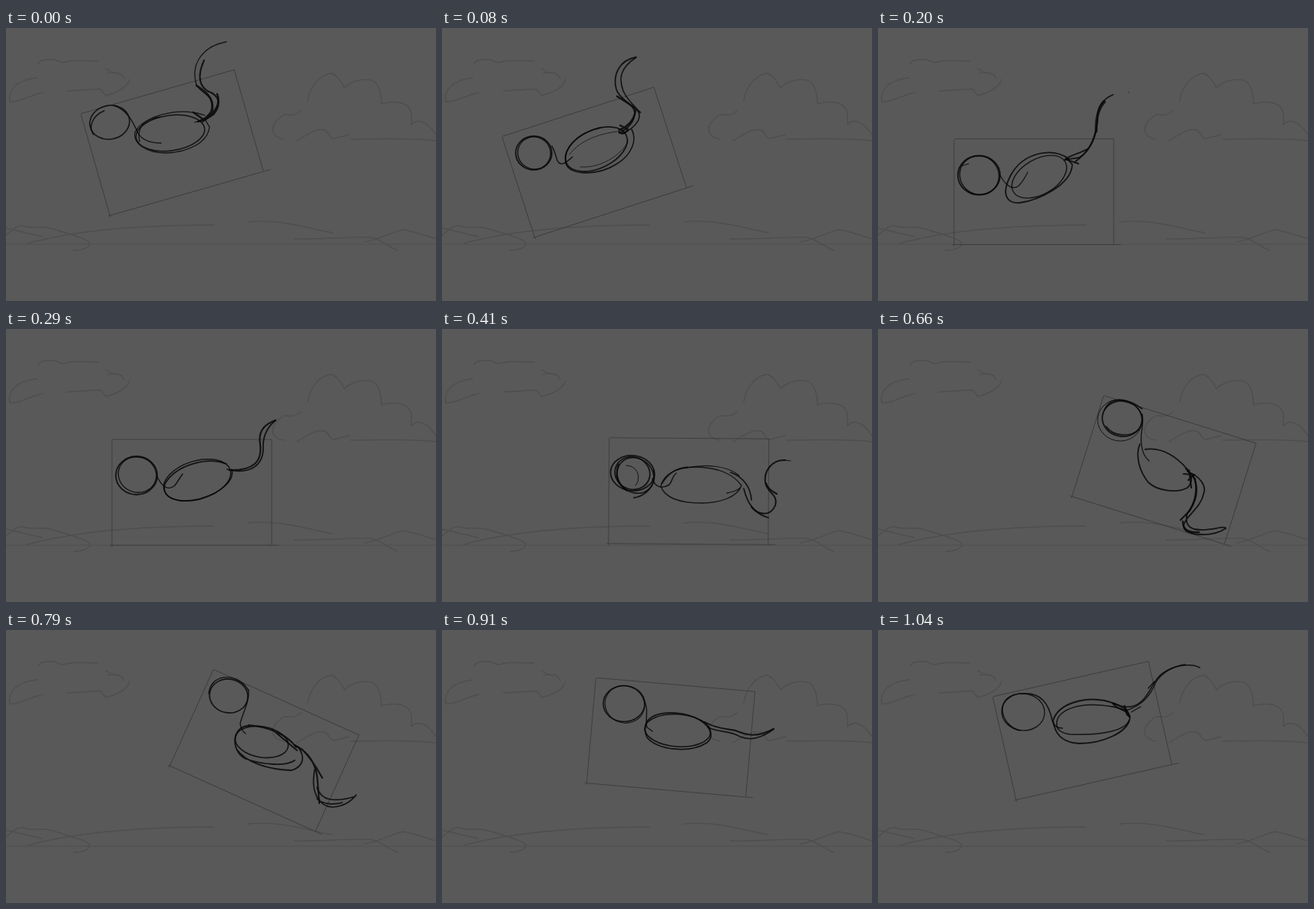
Animation, 560 px wide and 356 px high, one loop 1.16 s. Source, as an HTML page:

```html
<!DOCTYPE html>
<html lang="en">
<head>
<meta charset="utf-8">
<title>Leaping sketch</title>
<style>
html, body { margin: 0; width: 100%; height: 100%; overflow: hidden; background: #595959; }
svg { display: block; width: 100%; height: 100%; }
path, ellipse { fill: none; stroke-linecap: round; stroke-linejoin: round; }
#scenery path { stroke: #4e4e4e; stroke-width: 1.4; }
.frame { stroke: #393939; stroke-width: .8; }
.ink { stroke: #080808; }
</style>
</head>
<body>
<svg id="stage" viewBox="0 0 560 356" xmlns="http://www.w3.org/2000/svg">
  <g id="scenery">
    <path d="M5 96C2 82 12 68 40 65M5 96C15 98 30 88 48 84M42 47C44 41 52 41 62 41C66 41 70 46 75 45C83 42 90 42 120 43M130 53L138 58L146 59M132 59C145 57 150 58 154 66M161 67C158 78 145 84 130 88C124 82 126 78 115 80L80 82"/>
    <path d="M393 95C396 75 410 60 424 59C432 62 436 70 441 78C450 68 470 64 480 70C488 78 489 90 489 99C500 95 515 96 522 101C530 108 528 115 528 126C538 116 550 124 560 139"/>
    <path d="M384 108C375 116 370 113 362 113C350 120 346 128 348 136C350 142 356 144 362 145M379 147C390 140 405 130 415 133C422 136 420 144 428 144L447 139M449 145C490 144 530 144 560 147"/>
    <path d="M28 281C90 264 180 257 270 257M0 270C10 262 14 257 22 258C35 262 45 258 58 261C80 268 105 274 109 280C110 287 98 290 88 290M0 261L47 272"/>
    <path d="M315 253C350 248 390 260 425 267M375 275C410 276 440 272 475 273C490 276 495 284 510 290M467 279C485 276 505 265 517 263C530 265 545 270 560 275"/>
    <path d="M0 282H560" style="stroke-width:1"/>
  </g>
</svg>
<script>
const stage = document.getElementById('stage');
const LOOP = 1160;

function add(parent, tag, attrs) {
  const node = document.createElementNS(stage.namespaceURI, tag);
  for (const key in attrs) node.setAttribute(key, attrs[key]);
  return parent.appendChild(node);
}

// box: centre x, centre y, angle; rings: cx, cy, rx, ry, angle, width; lines: width, path
const poses = [
  { at: 0, box: [216.3, 149.5, -16],
    rings: [[135, 123, 26, 22, -12, 1.6], [214, 137, 45, 23, -8, 1.5]],
    lines: [
      [1.4, 'M128 108C112 114 107 130 114 139M140 101C158 106 166 124 172 137C178 148 190 150 202 150'],
      [1.3, 'M259 114C225 102 178 115 168 136C165 150 182 163 208 163C240 162 263 148 265 129L259 119M174 148C170 130 180 118 201 116'],
      [1.3, 'M287 18C255 24 240 48 248 74C254 86 268 85 268 103C267 115 256 120 246 123'],
      [2, 'M258 42C249 62 252 75 262 82C280 88 280 102 270 113L256 122'],
      [2.4, 'M248 75C266 86 272 96 268 110L258 120M275 86C280 98 272 116 250 122M244 110L258 120']
    ] },
  { at: 80, box: [198.3, 175, -18],
    rings: [[119.5, 163, 23.5, 22, 0, 1.8], [120, 163, 21.5, 21, 30, 1.4], [201, 158, 43, 25, -25, 1.7]],
    lines: [
      [1.4, 'M143 154C150 165 148 176 155 177C160 178 165 172 170 168'],
      [1.6, 'M247 132C255 147 246 166 228 177C205 192 166 194 161 176C158 158 174 137 207 130'],
      [.8, 'M166 165C180 146 205 138 228 135M180 181C205 184 235 165 242 148'],
      [1.8, 'M253 38C230 42 222 62 227 80C232 95 250 98 251 110C251 122 244 130 231 137'],
      [1.6, 'M252 39C232 52 230 66 236 82C244 100 258 104 257 116C255 126 245 133 235 138'],
      [2.3, 'M228 89C240 97 248 101 258 110M252 108C250 122 239 130 231 133C228 138 238 140 242 132L232 127']
    ] },
  { at: 160, box: [198, 198, -9],
    rings: [[122, 179, 25, 24, 0, 1.8], [123, 178, 23, 23, 0, 1.3], [204, 177, 43, 25, -28, 1.6]],
    lines: [
      [1.4, 'M147 174C154 188 158 196 168 194C175 191 180 183 183 178'],
      [1.6, 'M247 151C256 164 246 186 220 200C196 212 164 215 163 196C165 175 185 151 215 148'],
      [2.2, 'M276 62C257 71 256 85 260 104C268 128 262 143 239 155'],
      [1.9, 'M276 62C262 76 261 92 266 108C270 135 258 148 238 157']
    ] },
  { at: 200, box: [203, 213.5, 0],
    rings: [[131.5, 192, 27.5, 25.5, 0, 1.8], [132, 192, 26, 25, 40, 1.5], [210, 194, 39, 23, -30, 1.4]],
    lines: [
      [1.2, 'M108 180L118 177M159 192C166 205 175 212 183 206C189 200 192 194 195 188'],
      [1.8, 'M248 170C225 155 190 163 174 190C160 215 166 229 184 228C208 225 252 205 253 178L245 169'],
      [1.8, 'M306 87C290 94 286 104 286 115C286 140 277 160 262 169L243 172'],
      [3.5, 'M295 96C287 105 284 116 284 135'],
      [2, 'M283 136C279 153 271 164 256 175M274 157C263 164 254 164 244 171L261 177'],
      [.7, 'M326 84L327 84']
    ] },
  { at: 290, box: [242, 213, 0],
    rings: [[170, 191, 27, 25, 0, 1.8], [171, 190, 25, 23, 20, 1.4], [249, 197, 45, 25, -17, 1.5]],
    lines: [
      [1.4, 'M197 193C204 207 212 211 220 204L230 189'],
      [1.6, 'M287 176C263 166 221 177 207 202C202 220 222 228 250 222C281 214 298 197 294 183'],
      [2.2, 'M351 119C331 126 329 139 331 150C334 173 322 185 291 184'],
      [1.8, 'M351 119C337 131 334 145 335 157C334 180 315 190 288 183']
    ] },
  { at: 350, box: [282, 212, .2],
    rings: [[209, 190, 27, 24, 0, 1.8], [210, 189, 25, 22, 15, 1.5], [294, 201, 50, 24, -5, 1.5]],
    lines: [
      [1.4, 'M236 194C241 207 250 210 258 203L267 188'],
      [1.4, 'M247 202C254 184 281 175 308 178C330 180 346 190 346 201'],
      [2, 'M342 190C355 211 371 220 381 209C391 194 376 181 381 165C386 151 398 147 407 148'],
      [1.8, 'M346 198C357 219 374 222 382 207']
    ] },
  { at: 410, box: [321.3, 211.5, .4],
    rings: [[248, 188, 28.5, 23, 5, 1.8], [248, 188, 23, 21, 20, 1.8], [252, 191, 25, 22, 40, 1.5]],
    lines: [
      [1, 'M240 178C255 178 260 195 252 204'],
      [1.8, 'M276 184C280 205 264 218 250 220M230 176C224 192 230 204 241 211'],
      [1.5, 'M274 195C278 208 288 208 296 203C300 198 300 192 305 188M286 202C295 188 305 181 320 180'],
      [1.3, 'M285 205C288 190 305 180 330 180C360 180 380 190 390 204C385 220 360 227 338 227C310 227 290 220 285 205M390 204C388 210 380 212 371 214'],
      [1.2, 'M318 181C345 176 371 178 387 191'],
      [1.7, 'M376 187C393 193 402 207 403 223M393 208C398 230 410 242 425 246'],
      [2, 'M403 232C412 243 428 245 434 230C438 215 424 215 421 200C419 185 430 170 447 171'],
      [1, 'M445 171L454 172'],
      [2.2, 'M422 201C424 209 432 213 436 215']
    ] },
  { at: 540, box: [346, 203, 8],
    rings: [[284, 153, 27, 23.5, 5, 1.8], [283, 154, 25, 24, 30, 1.3]],
    lines: [
      [1.5, 'M311 154C315 169 311 180 319 184C323 184 325 179 327 175'],
      [1.7, 'M314 178C312 195 325 213 352 217C378 220 397 212 399 200C391 182 360 167 331 170C322 172 316 176 314 178'],
      [1.8, 'M391 190C409 199 415 213 414 224C407 243 416 258 431 254C439 247 440 236 453 230'],
      [1.9, 'M397 199C409 214 403 235 411 249C422 261 435 255 439 241']
    ] },
  { at: 660, box: [372.5, 183.7, 17.4],
    rings: [[318, 117, 26, 23, 10, 1.8], [315, 119, 29, 27, 10, .9]],
    lines: [
      [1.6, 'M295 106C302 87 325 90 344 104M297 127C308 142 330 140 340 131'],
      [1.4, 'M344 111C347 125 341 135 343 150C344 160 348 168 353 172'],
      [1.8, 'M341 150C335 165 340 185 352 200C365 212 390 214 403 207C410 200 410 192 402 182C390 168 370 153 348 157'],
      [1.8, 'M403 186C420 192 428 205 424 215C420 235 398 245 398 258C400 270 435 272 453 260C452 255 430 265 412 261C402 258 400 250 403 240C412 228 416 215 413 195'],
      [2.3, 'M410 191C419 208 414 224 406 237L394 249M397 251C397 262 405 266 418 265'],
      [2.2, 'M401 182L411 193M398 189L412 190L404 197M405 184L408 207']
    ] },
  { at: 790, box: [336.5, 157, 24.3],
    rings: [[290, 86, 25, 22, 10, 1.7], [333, 146, 35, 20, 10, 1.6]],
    lines: [
      [1.4, 'M264 83C267 53 307 57 316 80M316 78C317 95 308 108 305 122C306 130 309 133 312 135'],
      [1.8, 'M316 125C294 125 292 158 312 168C335 176 365 178 376 170M300 155C312 173 342 182 372 183C388 178 390 165 380 152'],
      [2.1, 'M316 124C340 126 365 135 378 153M347 130L379 157'],
      [2.1, 'M376 150C395 160 405 175 406 200L408 226M385 155C398 168 405 180 412 193'],
      [1.7, 'M402 182C396 214 409 230 425 231C440 230 450 223 456 215M405 205C410 223 428 225 455 217M405 220C413 228 428 228 438 225']
    ] },
  { at: 910, box: [298, 140, 5],
    rings: [[237, 96, 27, 23.5, 0, 1.6], [238, 97, 26, 24, 20, 1.2], [307, 131, 43, 21, 4, 1.6]],
    lines: [
      [1.4, 'M263 91C270 104 264 117 267 127L274 132'],
      [1.7, 'M265 125C268 107 302 103 329 114C351 124 355 139 345 147C323 161 280 157 267 140C264 134 264 129 265 125'],
      [2, 'M342 120C360 130 374 129 382 131C396 137 409 141 432 129'],
      [1.6, 'M346 127C362 134 375 131 388 139C402 145 418 140 432 129']
    ] },
  { at: 1040, box: [266, 131.2, -12.8],
    rings: [[189, 107, 28, 24, 5, 1.3]],
    lines: [
      [1.5, 'M190 83C172 82 161 92 162 106C164 119 174 129 185 131'],
      [1.7, 'M190 83C212 82 222 95 227 118C229 126 234 128 240 128'],
      [1.9, 'M228 118C235 95 270 87 295 92C315 97 328 105 328 115C325 135 290 148 262 148C240 147 230 135 228 118'],
      [1.5, 'M233 125C230 105 260 95 290 98C315 100 325 105 327 113M327 118C322 130 295 138 250 136C240 135 233 130 233 125'],
      [1.6, 'M306 95C325 105 340 100 350 85C360 70 362 60 378 52C390 46 408 43 419 49'],
      [1.4, 'M323 105C345 98 355 85 362 68C370 55 385 47 400 45M330 107L342 100M352 76L360 67'],
      [2.2, 'M306 96C310 102 318 103 325 107L321 99L324 110L328 113']
    ] }
];

function drawPose({ box: [x, y, angle], rings, lines }) {
  const group = add(stage, 'g', { visibility: 'hidden' });
  add(group, 'path', {
    class: 'frame', transform: `translate(${x} ${y}) rotate(${angle})`,
    d: 'M-103-69H104V68M-106 69H113M-104-68V71'
  });
  for (const [cx, cy, rx, ry, turn, width] of rings) {
    add(group, 'ellipse', {
      class: 'ink', cx, cy, rx, ry, 'stroke-width': width,
      transform: `rotate(${turn} ${cx} ${cy})`, opacity: .85
    });
  }
  for (const [width, d] of lines) {
    add(group, 'path', { class: 'ink', d, 'stroke-width': width, opacity: .85 });
  }
  return group;
}

const drawings = poses.map(drawPose);

function render(time) {
  const current = poses.findLastIndex(pose => pose.at <= time);
  drawings.forEach((group, i) => group.setAttribute('visibility', i === current ? 'visible' : 'hidden'));
}

const start = performance.now();
function tick() {
  render((performance.now() - start) % LOOP);
  requestAnimationFrame(tick);
}
tick();
</script>
</body>
</html>
```
